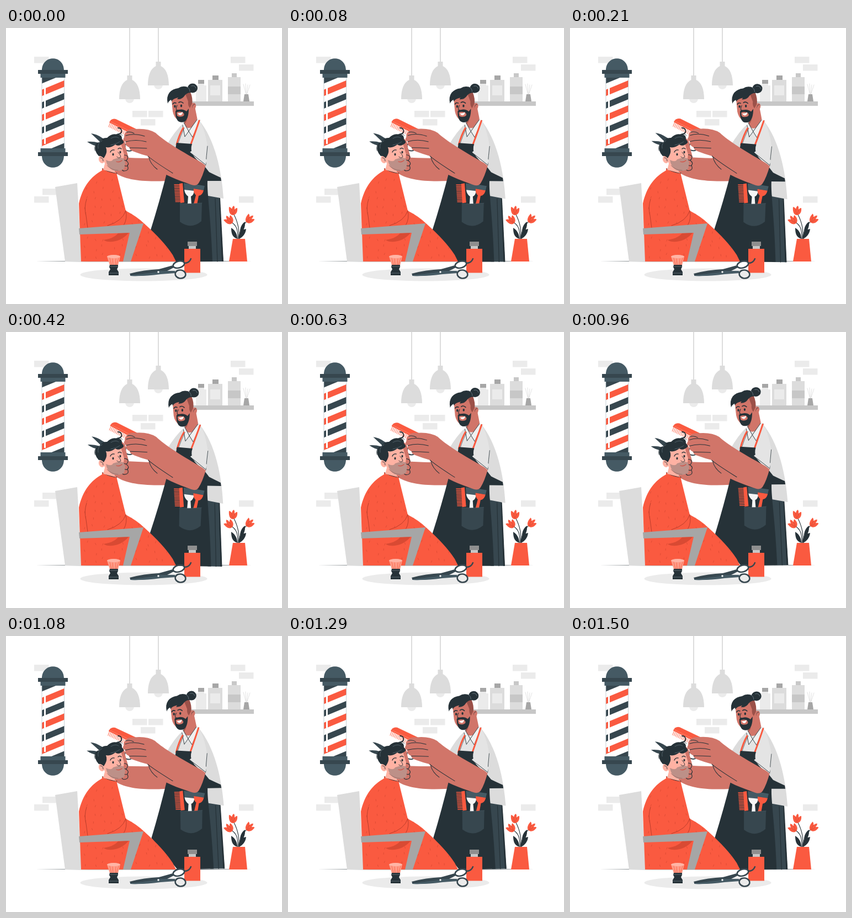
An HTML page with a canvas that plays this animation: 500 px wide and 500 px high, repeating every 1.54 s.

```html
<!DOCTYPE html>
<html lang="en">
<head>
<meta charset="utf-8">
<title>Barber shop</title>
<style>
  html, body { margin: 0; width: 100%; height: 100%; overflow: hidden; background: #fff; }
  canvas { display: block; width: 500px; height: 500px; }
</style>
</head>
<body>
<canvas id="stage"></canvas>
<script>
const SIZE = 500, LOOP = 1540;
const RED = '#fa5a40', INK = '#263238', STEEL = '#37474f', SLATE = '#455a64';
const SKIN = '#d17569', PINK = '#ffb2a3', BEARD = '#bd9088';
const GREY = ['#ebebeb', '#dcdcdc', '#c7c7c7', '#a6a6a6'];

const canvas = document.getElementById('stage');
const ctx = canvas.getContext('2d');
const ratio = window.devicePixelRatio || 1;
canvas.width = canvas.height = SIZE * ratio;

const paths = new Map();
function path(d) {
  if (!paths.has(d)) paths.set(d, new Path2D(d));
  return paths.get(d);
}
function fill(color, d) {
  ctx.fillStyle = color;
  ctx.fill(path(d));
}
function line(color, width, d) {
  ctx.strokeStyle = color;
  ctx.lineWidth = width;
  ctx.stroke(path(d));
}
function rect(color, x, y, w, h) {
  ctx.fillStyle = color;
  ctx.fillRect(x, y, w, h);
}
function oval(color, x, y, rx, ry = rx, turn = 0) {
  ctx.fillStyle = color;
  ctx.beginPath();
  ctx.ellipse(x, y, rx, ry, turn, 0, 2 * Math.PI);
  ctx.fill();
}
function ring(color, width, x, y, rx, ry, turn = 0) {
  ctx.strokeStyle = color;
  ctx.lineWidth = width;
  ctx.beginPath();
  ctx.ellipse(x, y, rx, ry, turn, 0, 2 * Math.PI);
  ctx.stroke();
}
function randomizer(seed) {
  return () => (seed = seed * 16807 % 2147483647) / 2147483647;
}

function drawLamp(x, y) {
  rect(GREY[2], x - 0.6, 0, 1.2, y);
  ctx.save();
  ctx.translate(x, y);
  oval(GREY[0], 0, 42, 8);
  fill(GREY[1], 'M-4.500 0H4.500V8C14 12 19 25 19 43H-19C-19 25 -14 12 -4.500 8Z');
  ctx.restore();
}

function drawShelf() {
  rect(GREY[2], 335, 133, 114, 8);
  rect(GREY[3], 348, 94, 11, 7);
  fill(GREY[0], 'M348 101H359V104H363V133H344V104H348Z');
  rect(GREY[3], 374, 86, 11, 8);
  rect(GREY[1], 366, 94, 26, 39);
  rect(GREY[0], 370, 104, 18, 18);
  rect(GREY[2], 409, 82, 9, 8);
  rect(GREY[1], 402, 89, 23, 44);
  rect(GREY[2], 402, 106, 23, 14);
  line(GREY[1], 0.8, 'M435 121L430 102M435 121L434 101M436 121L438 103M436 121L442 103');
  fill(GREY[3], 'M432 120H439L441 133H430Z');
}

function drawPole() {
  fill(SLATE, 'M65 77C65 48 105 48 105 77ZM65 231C65 260 105 260 105 231Z');
  rect('#fff', 65, 90, 41, 128);
  ctx.save();
  ctx.beginPath();
  ctx.rect(65, 90, 41, 128);
  ctx.clip();
  for (let i = 0; i < 7; i++) {
    const y = 89 + 22.7 * i;
    ctx.fillStyle = i % 2 ? RED : STEEL;
    ctx.beginPath();
    ctx.moveTo(65, y);
    ctx.lineTo(106, y - 17);
    ctx.lineTo(106, y - 5.5);
    ctx.lineTo(65, y + 11.5);
    ctx.fill();
  }
  ctx.restore();
  rect('#fff', 69, 107, 3, 103);
  line('#b0bec5', 0.7, 'M65 90V218M105.500 90V218');
  for (const y of [83, 218]) rect(SLATE, 62.5, y, 45, 7);
  for (const y of [76, 225]) rect(STEEL, 58, y, 54, 7);
}

function drawFlower(x, y, turn) {
  ctx.save();
  ctx.translate(x, y);
  ctx.rotate(turn);
  fill(RED, 'M0 8C-5 8 -8 2 -7 -7Q-3 -6 -2 -3Q-1 -8 2 -9Q4 -6 3 -2Q5 -5 8 -5C9 3 5 8 0 8Z');
  line('#c9442f', 0.6, 'M-2 -3Q-3 2 0 6M3 -2Q3 3 0 6');
  ctx.restore();
}

function drawPlant() {
  line(INK, 1.1, 'M420 382C420 366 419 358 406 350M421 382C424 365 419 350 413 338M423 382C422 366 429 356 440 347');
  fill(INK, 'M419 382C409 379 408 370 408 362C416 367 419 374 419 382ZM422 382C421 372 426 365 435 364C434 373 429 379 422 382ZM424 374C423 361 428 354 433 351C434 362 429 369 424 374Z');
  drawFlower(411, 331, 0);
  drawFlower(404, 348, -0.75);
  drawFlower(441, 346, 0.65);
  fill(RED, 'M411 382H433L437 423H404Z');
}

function drawBackdrop() {
  const bricks = [[51, 52], [407, 52], [422, 66], [229, 150], [258, 150], [244, 165], [66, 291], [51, 305], [422, 305]];
  for (const [x, y] of bricks) rect(GREY[0], x, y, 26.5, 11.5);
  drawLamp(224, 86);
  drawLamp(276, 61);
  drawShelf();
  drawPole();
  oval(GREY[0], 249.5, 447, 115, 11.5);
  fill(INK, 'M54 422.700L150 422.200H350L446 422.700L350 423.300H150Z');
  drawPlant();
}

function drawHandScissors() {
  fill(STEEL, 'M154 191Q164 192 174 199L207 216L205 219L170 206ZM147 206Q158 205 168 208L210 214V217L168 214Q156 213 147 206Z');
  ring(STEEL, 2, 220, 217, 9, 5, 0.4);
  line(STEEL, 2, 'M205 211Q212 208 216 214');
}

function drawFarArm() {
  fill(SKIN, 'M207 199Q217 203 216 213L222 235Q246 236 264 236L300 240L290 277C250 279 215 276 196 261Z');
  fill(SKIN, 'M208 229Q223 227 221 236Q220 240 217 240Q224 244 220 250Q224 254 218 259L204 260Z');
  line(INK, 1.1, 'M214 230Q224 231 219 239Q217 241 213 239M217 240Q225 245 219 250Q216 251 213 248M220 250Q224 258 214 259Q211 259 210 256');
}

function drawTools() {
  fill(RED, 'M314 282L320 281L323 316L316 317Z');
  for (let i = 0; i < 12; i++) {
    const y = 283 + i * 2.8;
    rect(RED, 304.5 + i * 0.2, y, 12, 1.5);
  }
  fill(SLATE, 'M322 281L342 284L340 295L323 293ZM342 283L360 286L358 294L340 291Z');
  fill('#f5f5f5', 'M323 293L341 295Q340 303 335 305L336 319H329L330 305Q324 301 323 293Z');
  fill(RED, 'M340 291L358 294Q356 303 349 304L346 320L340 319L344 303Q339 298 340 291Z');
  fill(STEEL, 'M315 318Q334 319 355 317L354 350Q335 366 315 351Z');
  line('#53656e', 0.5, 'M315 318Q334 319 355 317');
}

function drawBarberHead() {
  fill(SKIN, 'M330 150L342 142L347 167Q343 182 329 181Q322 178 323 166Z');
  fill('#a8574d', 'M328 160Q329 169 323 174L323 165Z');
  oval(SKIN, 339.5, 142, 4.5, 6.5, 0.25);
  line(INK, 0.8, 'M337 144Q338 138 342 138');
  fill(SKIN, 'M300 131Q301 122 325 116Q337 119 338 139Q337 151 331 161Q324 172 312 167Q304 162 302 151Z');
  fill('#9b5149', 'M324 117L334 116Q339 128 337 137L333 145Q329 140 330 133Z');
  fill(INK, 'M307 153Q306 148 313 148Q321 146 327 151L331 146Q331 165 323 170Q312 173 309 164Q307 160 307 153Z');
  fill(SKIN, 'M309 153Q314 150 321 153Q325 158 320 160Q313 162 310 159Z');
  fill('#fff', 'M311 154Q316 155 320 152Q320 158 315 158Q312 157 311 154Z');
  line(INK, 1.1, 'M310 140Q306 149 311 149');
  oval(INK, 306, 142, 1.7, 2.4);
  oval(INK, 317.5, 141, 1.7, 2.4);
  line(INK, 1.6, 'M302 138Q304 134 308 136M313 135Q317 132 321 136');
  fill(INK, 'M293 137Q290 125 296 117Q302 110 312 109Q321 103 331 108L335 117Q328 117 324 122Q319 130 310 129L312 126Q302 128 300 133L299 130Q294 133 293 137Z');
  oval(INK, 338, 109, 9, 8.5);
  line('#71808a', 0.8, 'M328 107Q333 109 333 115M336 105Q342 103 344 109');
}

function drawBarberBody() {
  fill(STEEL, 'M360 300L387 306L393.700 423H368Z');
  line(INK, 1.2, 'M379 309L383 423');
  fill(INK, 'M386 307L388 308L394 423H391Z');
  fill(GREY[1], 'M322 172Q305 187 290 214L300 240L357 250L366 304L394 309C391 260 379 202 349 166Z');
  fill('#e4e4e4', 'M322 172L349 166Q360 180 365 215L361 249L332 229L330 212L306 210Z');
  line(INK, 0.8, 'M365 214Q363 232 362 247');
  drawBarberHead();
  fill('#f0f0f0', 'M322 171L331 187L347 164L351 168L339 198L331 187L325 198L319 177Z');
  line(INK, 0.9, 'M320 176L324 197L331 187L338 198L351 167M322 171L331 187L346 166');
  line(RED, 3, 'M321 181Q314 193 309 211M350 168Q344 186 334 213');
  line(INK, 0.6, 'M323 181Q316 196 311 211');
  fill(INK, 'M309 208L337 210Q330 230 357 247L368 261Q380 267 389 271L390 277L365 277C364 300 371 340 374 423H308L262 366Q278 315 292 260Q306 230 309 208Z');
  drawTools();
}

function drawComb() {
  for (let i = 0; i < 12; i++) {
    ctx.strokeStyle = '#ff907c';
    ctx.lineWidth = 1.3;
    ctx.beginPath();
    ctx.moveTo(190 + i * 2.6, 169 + i * 1.3);
    ctx.lineTo(186 + i * 2.6, 179 + i * 1.3);
    ctx.stroke();
  }
  fill(RED, 'M187 171Q191 163 199 165L236 183L230 193Z');
  line('#ff907c', 0.7, 'M190 170L225 187');
}

function drawNearArm() {
  fill(SKIN, 'M218 189Q220 182 233 183Q257 181 271 190C286 204 315 222 362 248Q356 270 349 281Q345 287 336 284C310 275 286 266 271 253Q260 242 257 232Q245 229 232 224Q223 221 224 217Q214 212 217 206Q210 203 214 198Q214 191 218 189Z');
  line(INK, 1, 'M217 195Q232 190 251 196M217 206Q235 201 254 206M224 217Q239 217 255 218M218 189Q226 187 232 191');
  line(INK, 1, 'M257 232C267 241 288 254 302 263M259 235Q262 247 274 256');
  fill('#e4e4e4', 'M333 225L341 219L364 239L361 249Z');
  line(INK, 0.9, 'M333 225L362 248');
}

function drawBarber() {
  drawHandScissors();
  drawFarArm();
  drawBarberBody();
  drawComb();
  drawNearArm();
}

function drawClientHead() {
  fill(PINK, 'M174 225Q185 208 208 209L214 229L211 251Q204 260 194 257L200 263L176 257L179 246Z');
  fill(BEARD, 'M181 239Q191 244 194 238Q204 234 213 236L216 244L214 255Q205 261 194 258Q183 253 181 239Z');
  line('#8f625c', 0.7, 'M183 249Q190 257 203 258');
  oval(PINK, 173.5, 238, 5.5, 7, -0.3);
  line(INK, 0.9, 'M171 235Q176 235 176 241');
  fill(INK, 'M168 232Q159 222 162 213Q164 207 169 207Q174 198 183 199Q192 190 201 193Q211 192 210 202Q217 207 209 211Q203 215 198 211Q190 218 181 216Q184 224 180 231L177 236Q172 231 168 232Z');
  line(INK, 1.9, 'M202 193Q211 191 209 185Q208 181 203 181');
  line(INK, 0.8, 'M166 209Q159 211 161 222M199 193Q207 189 211 195');
  line('#60717a', 0.7, 'M174 204Q165 208 167 218M190 200Q199 195 204 199M190 212Q200 210 206 206');
  oval(INK, 194, 229, 1.5, 2.3);
  oval(INK, 207, 225, 1.5, 2.3);
  line(INK, 1.4, 'M189 225Q191 220 196 221M203 219Q206 216 209 219');
  line(INK, 0.9, 'M203 225Q211 234 206 235Q202 236 201 233');
  line('#d64c40', 1.2, 'M200 242Q205 244 210 240');
}

function drawCape() {
  fill(GREY[1], 'M89 288L129 281L137 423H107Z');
  const outline = 'M174 254Q188 260 200 261L201 266L217 331Q238 342 250 354Q285 385 302 411L308 423H136L132 318C139 287 154 269 174 258Z';
  fill(RED, outline);
  ctx.save();
  ctx.clip(path(outline));
  const random = randomizer(37);
  ctx.strokeStyle = '#d94a33';
  ctx.lineWidth = 0.8;
  for (let y = 272; y < 422; y += 15) {
    for (let x = 139; x < 305; x += 16) {
      const px = x + random() * 10, py = y + random() * 9, tilt = random() * 3 - 1.5;
      ctx.beginPath();
      ctx.moveTo(px, py);
      ctx.lineTo(px + tilt, py + 3);
      ctx.stroke();
    }
  }
  ctx.restore();
  line(INK, 1, 'M175 255Q187 262 201 263');
  line('#b53c2b', 0.9, 'M146 310Q141 325 145 340L148 362M217 331Q211 350 184 358M217 331Q220 345 214 356');
  fill('#d94a33', 'M177 384Q196 381 203 372L223 370Q211 385 193 387Q182 388 177 384Z');
}

function drawChairArm() {
  fill(GREY[3], 'M132 363L249 354L226 423H212L224 371L133 374Z');
}

function drawShavingBrush() {
  fill('#ff9c88', 'M183 414Q195 408 207 414L203 430H188Z');
  oval('#ffb5a6', 195, 414, 12, 3);
  line(RED, 0.7, 'M188 417L191 429M193 418L194 429M199 418L198 429M204 417L200 429');
  fill(INK, 'M188 429H203V433L201 437L204 442V448H186V442L189 437L187 433Z');
  line('#708089', 0.7, 'M188 432H203M187 444H204');
}

function drawBottle() {
  rect('#8f8f8f', 329, 387, 17, 8);
  rect(GREY[2], 331, 395, 13, 5);
  rect(RED, 323, 400, 29, 43.5);
}

function drawFloorScissors() {
  fill(STEEL, 'M224 445Q250 438 277 437L302 430L304 434L284 444Q252 450 226 449Z');
  fill(SLATE, 'M225 447L275 440L306 440L307 444L280 446Q250 450 225 449Z');
  line(INK, 0.7, 'M226 447L277 441');
  ring(STEEL, 2.6, 313, 428.5, 10.5, 6, -0.28);
  ring(STEEL, 2.6, 316, 446, 9.5, 7.5, 0.15);
  line(STEEL, 2.4, 'M323 426Q332 426 335 418');
  oval('#fff', 276, 442, 1.7);
}

// Sway: up to one degree each way, with turning points at 1/4 and 3/4 of the loop.
function swayDegrees(phase) {
  if (phase < 0.25) return phase * 4;
  if (phase < 0.75) return 2 - phase * 4;
  return phase * 4 - 4;
}

function draw(time) {
  ctx.setTransform(ratio, 0, 0, ratio, 0, 0);
  ctx.lineCap = ctx.lineJoin = 'round';
  rect('#fff', 0, 0, SIZE, SIZE);
  drawBackdrop();

  ctx.save();
  ctx.translate(270, 263);
  ctx.rotate(swayDegrees(time % LOOP / LOOP) * Math.PI / 180);
  ctx.translate(-270, -263);
  drawBarber();
  ctx.restore();

  drawCape();
  drawClientHead();
  drawChairArm();
  drawShavingBrush();
  drawBottle();
  drawFloorScissors();
}

const start = performance.now();
function tick() {
  draw(performance.now() - start);
  requestAnimationFrame(tick);
}
tick();
</script>
</body>
</html>
```
